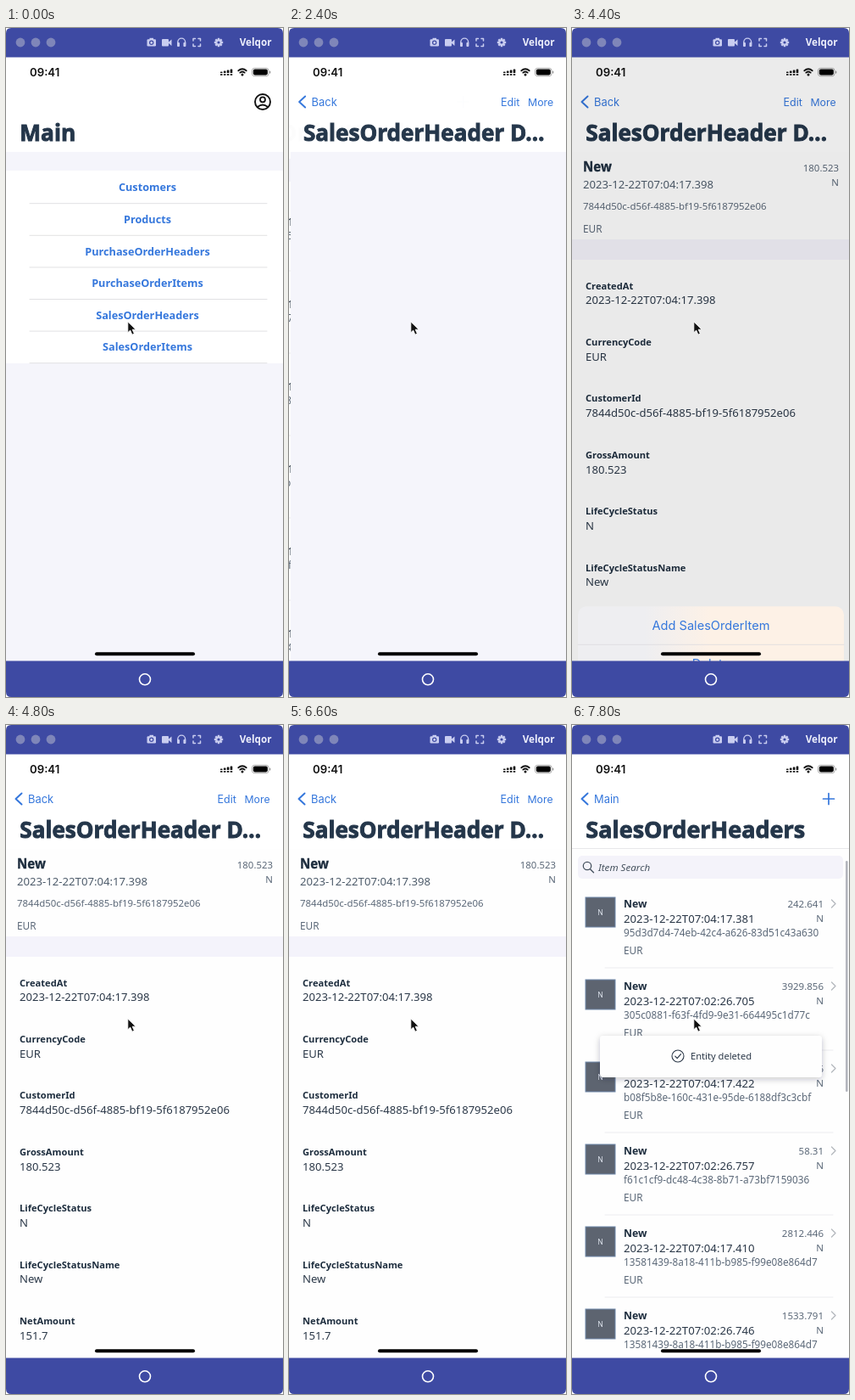
Recreate the animation shown at these times as an HTML page. Size 327 by 788 pixels, loop 8000 ms.

```html
<!DOCTYPE html>
<html lang="en">
<head>
<meta charset="utf-8">
<title>Order app demo</title>
<style>
html, body { margin: 0; width: 100%; height: 100%; overflow: hidden; background: #fff; }
svg { display: block; width: 100%; height: 100%; }
text { font-family: 'Noto Sans', sans-serif; white-space: pre; }
.title { font-weight: 700; fill: #24364a; stroke: #24364a; stroke-width: .9; }
.heavy { font-weight: 700; stroke: #1d2d3e; stroke-width: .35; }
.system { font-family: Inter, sans-serif; }
.semibold { font-family: Inter, sans-serif; font-weight: 600; }
.line { fill: none; stroke-linecap: round; stroke-linejoin: round; }
</style>
</head>
<body>
<svg id="stage" viewBox="0 0 327 788"></svg>
<script>
const BLUE = '#3577dc', INK = '#1d2d3e', GRAY = '#5b6878';
const WIDTH = 327, LOOP = 8000, STEP = 200, PARALLAX = 98, SLIDE = 490;

const text = (x, y, str, size, fill = INK, more = '') =>
  `<text x="${x}" y="${y}" font-size="${size}" fill="${fill}" ${more}>${str}</text>`;
const rect = (x, y, w, h, fill, more = '') =>
  `<rect x="${x}" y="${y}" width="${w}" height="${h}" fill="${fill}" ${more}/>`;
const line = (d, stroke, width = 1) =>
  `<path class="line" d="${d}" stroke="${stroke}" stroke-width="${width}"/>`;
const ring = (x, y, r, stroke, width) =>
  `<circle cx="${x}" cy="${y}" r="${r}" fill="none" stroke="${stroke}" stroke-width="${width}"/>`;
const bold = 'font-weight="700"', mid = 'text-anchor="middle"', end = 'text-anchor="end"';
const heavy = 'class="heavy"', system = 'class="system"', semibold = 'class="semibold"';
const title = (str, size) => text(16.3, 132.5, str, size, '#24364a', 'class="title"');
const group = (id, body) => `<g id="${id}">${body}</g>`;

const mainHead = () => title('Main', 26.3) + ring(303, 87, 9, '#111', 1.9) +
  ring(303, 84.3, 3, '#111', 1.8) + line('M297 93Q303 88 309 93', '#111', 1.8);

function mainPage() {
  const names = ['Customers', 'Products', 'PurchaseOrderHeaders', 'PurchaseOrderItems',
    'SalesOrderHeaders', 'SalesOrderItems'];
  const rows = names.map((name, i) => {
    const y = 192.3 + i * 37.6;
    return text(167, y, name, 12.7, BLUE, `${bold} ${mid}`) + line(`M28 ${y + 14.4}H308`, '#dedee0', .9);
  }).join('');
  return rect(0, 34, WIDTH, 712, '#f5f5fb') + rect(0, 168, WIDTH, 227, '#fff') + rows;
}

// time, amount, id
const orders = [
  ['07:04:17.398', '180.523', '7844d50c-d56f-4885-bf19-5f6187952e06'],
  ['07:04:17.381', '242.641', '95d3d7d4-74eb-42c4-a626-83d51c43a630'],
  ['07:02:26.705', '3929.856', '305c0881-f63f-4fd9-9e31-664495c1d77c'],
  ['07:04:17.422', '1204.516', 'b08f5b8e-160c-431e-95de-6188df3c3cbf'],
  ['07:02:26.757', '58.31', 'f61c1cf9-dc48-4c38-8b71-a73bf7159036'],
  ['07:04:17.410', '2812.446', '13581439-8a18-411b-b985-f99e08e864d7'],
  ['07:02:26.746', '1533.791', '13581439-8a18-411b-b985-f99e08e864d7']
];

function orderRow([time, amount, id], i) {
  return `<g transform="translate(0 ${i * 97})">` +
    rect(16, 203, 35, 35, '#5d6470', 'stroke="#6f87aa"') +
    text(33.5, 223.5, 'N', 8.5, '#dfe5ee', mid) +
    text(61, 214.8, 'New', 12.3, INK, bold) +
    text(61, 232.5, `2023-12-22T${time}`, 13.2, '#2b3848') +
    text(61, 249, id, 11.75, GRAY) + text(61, 269.5, 'EUR', 11.8, GRAY) +
    text(297, 215, amount, 11.5, GRAY, end) + text(297, 232, 'N', 11.5, GRAY, end) +
    line('M306.5 206L311 210.5L306.5 215', '#b4b8be', 1.3) +
    line('M39 286H308', '#e9e9ec', .9) + '</g>';
}

const backLink = (label, color = BLUE) =>
  line('M18.5 80.5L11.5 87L18.5 93.5', color, 2) + text(26, 91.5, label, 12.9, color, system);

const listHead = () => line('M0 145.5H327', '#e2e2e5', .8) + backLink('Main') +
  line('M296.5 87H309.5M303 80.5V93.5', BLUE, 1.7) + title('SalesOrderHeaders', 27);

function listPage() {
  return rect(0, 34, WIDTH, 712, '#fefefe') + rect(7, 154, 313, 27, '#f4f3fa', 'rx="5"') +
    ring(18, 166, 4.7, '#46525f', 1.3) + line('M21.5 169.7L25.5 173.7', '#46525f', 1.4) +
    text(31, 171.8, 'Item Search', 11.6, '#46525f', 'font-style="italic"') +
    group('rowsBefore', orders.slice(0, 6).map(orderRow).join('')) +
    group('rowsAfter', orders.slice(1).map(orderRow).join('')) +
    rect(323, 160, 2.6, 272, '#b3b5bd', 'rx="1.3" id="listScroll"');
}

const detailNav = color => backLink('Back', color) +
  text(249.5, 91.5, 'Edit', 12.5, color, system) + text(281.5, 91.5, 'More', 12.3, color, system);

const detailHead = () => group('navActive', detailNav(BLUE)) +
  group('navDimmed', detailNav('#9b9b9f')) + title('SalesOrderHeader D…', 26.1);

function detailPage() {
  const [time, amount, id] = orders[0];
  const stamp = `2023-12-22T${time}`;
  const fields = [['CreatedAt', stamp], ['CurrencyCode', 'EUR'], ['CustomerId', id],
    ['GrossAmount', amount], ['LifeCycleStatus', 'N'], ['LifeCycleStatusName', 'New'], ['NetAmount', '151.7']];
  const body = rect(0, 146, WIDTH, 600, '#fefefe') + rect(0, 249, WIDTH, 24, '#f4f3fb') +
    text(13, 168.8, 'New', 15.1, INK, heavy) + text(13, 188.5, stamp, 13.15, '#4e5c6b') +
    text(13, 214, id, 11.45, GRAY) + text(13, 240.5, 'EUR', 11.8, GRAY) +
    text(315, 169, amount, 11.4, GRAY, end) + text(315, 186, 'N', 11.4, GRAY, end) +
    fields.map(([label, value], i) => {
      const y = 307.5 + i * 66.4;
      return text(16, y, label, 11.15, INK, bold) + text(16, y + 17.8, value, 13.1, '#2b3848');
    }).join('') + rect(324, 275, 2, 190, '#c4c5cc', 'rx="1" id="detailScroll"');
  return rect(0, 34, WIDTH, 712, '#f5f5fb') + group('detailBody', body);
}

function statusBar() {
  const bars = [0, 1, 2, 3].map(i =>
    rect(253 + i * 3.9, 51.5 - i, 2.6, 1.5 + i, '#111', 'rx=".6"') +
    rect(253 + i * 3.9, 54, 2.6, 1.8, '#111', 'rx=".6"')).join('');
  return text(28, 57, '09:41', 13.2, '#111', semibold) + bars +
    line('M274.3 50.3Q279 46.2 283.7 50.3M276.3 52.6Q279 50.4 281.7 52.6', '#111', 1.8) +
    '<circle cx="279" cy="55" r="1.5" fill="#111"/>' +
    rect(290.5, 47.3, 19.5, 9.4, 'none', 'rx="2.8" stroke="#999" stroke-width=".8"') +
    rect(291.8, 48.6, 17, 6.8, '#000', 'rx="1.8"') + rect(311, 50.5, 1.3, 3, '#999', 'rx=".6"');
}

function windowBars() {
  const bar = '#3e4aa3', ice = '#c9cdf0';
  const dots = [17, 35, 53].map(x => `<circle cx="${x}" cy="17" r="5.4" fill="#7f86b9"/>`).join('');
  const teeth = [0, 45, 90, 135].map(a =>
    rect(249.8, 11.8, 2.4, 10.4, ice, `transform="rotate(${a} 251 17)"`)).join('');
  return `<path d="M0 34.5V6Q0 0 6 0H321Q327 0 327 6V34.5ZM0 745.5H327V782Q327 788 321 788H6Q0 788 0 782Z" fill="${bar}"/>` +
    dots + rect(166.5, 13.2, 10.5, 8.3, ice, 'rx="1.2"') + rect(169.5, 11.8, 4.5, 3, ice) +
    ring(171.7, 17.3, 2.1, bar, 1.2) +
    rect(184, 13, 8, 8.5, ice, 'rx="1"') + `<path d="M192 16.5L195.5 13.5V21L192 18Z" fill="${ice}"/>` +
    line('M202.8 18V16.5A4.4 4.4 0 0 1 211.6 16.5V18', ice, 1.4) +
    rect(202, 17, 3, 5, ice, 'rx="1"') + rect(209.4, 17, 3, 5, ice, 'rx="1"') +
    line('M221 15V12.5H223.5M227 12.5H229.5V15M229.5 19V21.5H227M223.5 21.5H221V19', ice, 1.5) +
    teeth + `<circle cx="251" cy="17" r="3.8" fill="${ice}"/><circle cx="251" cy="17" r="1.6" fill="${bar}"/>` +
    text(313.5, 20.5, 'Velqor', 11.7, '#eceefb', `${bold} ${end}`) + ring(164, 767.3, 6.5, '#fff', 1.6);
}

const sheet = () => rect(7, 583, 314, 89, 'url(#glass)', 'rx="10"') +
  line('M7 628H321', '#dcdbe0', .8) + rect(7, 680, 314, 44, '#fefefe', 'rx="10"') +
  text(164, 610.3, 'Add SalesOrderItem', 14.6, BLUE, `${system} ${mid}`) +
  text(164, 655.7, 'Delete', 14.7, BLUE, `${system} ${mid}`) +
  text(164, 707.3, 'Cancel', 14.8, '#2d70d8', `${semibold} ${mid}`);

const dialog = () => rect(57, 345, 214, 98, 'url(#glass)', 'rx="10"') +
  line('M57 408.3H271M164 408.3V443', '#d8d8dd', .8) +
  text(164, 373.5, 'Confirmation', 13.65, INK, `${heavy} ${mid}`) +
  text(164, 389.3, 'Delete current entity?', 12.7, INK, mid) +
  text(110.5, 431.3, 'Cancel', 12.6, BLUE, `${system} ${mid}`) +
  text(217.5, 431.3, 'OK', 13, BLUE, `${system} ${mid}`);

const toast = () => rect(33, 366, 262, 49, '#fefefe', 'rx="4" filter="url(#shadow)"') +
  ring(125, 390, 7, '#2b3848', 1.1) + line('M121.8 390.2L124.2 392.6L128.5 387.6', '#2b3848', 1.2) +
  text(140, 394.3, 'Entity deleted', 11.15, '#2b3848');

document.getElementById('stage').innerHTML = `<defs>
  <linearGradient id="glass"><stop offset=".25" stop-color="#eeeef1"/><stop offset=".5" stop-color="#fdf1e6"/></linearGradient>
  <filter id="shadow" x="-10%" y="-30%" width="120%" height="170%"><feDropShadow dx="0" dy="2" stdDeviation="3.5" flood-color="#223" flood-opacity=".25"/></filter>
  <clipPath id="screen"><rect y="34" width="327" height="712"/></clipPath></defs>
  <g clip-path="url(#screen)">` +
  group('main', mainPage()) + group('list', listPage()) + group('detail', detailPage()) +
  rect(0, 34, WIDTH, 112, '#fff') +
  group('mainHead', mainHead()) + group('listHead', listHead()) + group('detailHead', detailHead()) +
  group('toast', toast()) + statusBar() + rect(0, 34, WIDTH, 712, '#000', 'id="dim"') +
  group('sheet', sheet()) + group('dialog', dialog()) +
  rect(105, 735.3, 118, 4, '#000', 'rx="2"') + '</g>' + windowBars() +
  '<path d="M143.8 346V358.8L146.7 356.1L148.9 361.2L151.4 360.1L149.2 355.2H153.2Z" fill="#111" stroke="#fff" stroke-width=".9"/>';

const el = id => document.getElementById(id);
const show = (id, alpha) => { el(id).style.opacity = +alpha; };
const move = (id, x, y = 0) => el(id).setAttribute('transform', `translate(${x} ${y})`);
const between = (t, from, to) => t >= from && t < to;
const ease = (t, start, length) => {
  const u = Math.min(1, Math.max(0, (t - start) / length));
  return 1 - (1 - u) ** 3;
};

// Pages slide over each other, their headers cross-fade. enter and leave run from 0 to 1.
function placePage(id, enter, leave) {
  move(id, WIDTH * (1 - enter) - PARALLAX * leave);
  move(id + 'Head', PARALLAX * (1 - enter - leave));
  show(id + 'Head', enter * (1 - leave));
}

function draw(t) {
  const listIn = ease(t, 800, SLIDE);
  const detailIn = ease(t, 2000, SLIDE) - ease(t, 6900, SLIDE);
  const sheetIn = ease(t, 3200, 400) - ease(t, 4300, 400);
  const dialogIn = ease(t, 4900, 250) - ease(t, 6300, 250);

  placePage('main', 1, listIn);
  placePage('list', listIn, detailIn);
  placePage('detail', detailIn, 0);
  move('sheet', 0, 170 * (1 - sheetIn));

  const deleted = t >= 6800;
  show('rowsBefore', t >= 1200 && !deleted);
  show('rowsAfter', deleted);
  show('listScroll', between(t, 1400, 2000) || t >= 7400);
  show('detailBody', t >= 2600);
  show('detailScroll', between(t, 2600, 3800) ? .3 : 0);

  const modal = Math.max(sheetIn, dialogIn);
  show('dim', .19 * modal);
  show('navActive', modal < .5);
  show('navDimmed', modal >= .5);
  show('dialog', dialogIn);
  show('toast', ease(t, 7300, 400));
}

const start = performance.now();
function tick() {
  const t = (performance.now() - start) % LOOP;
  draw(Math.floor(t / STEP) * STEP);
  requestAnimationFrame(tick);
}
tick();
</script>
</body>
</html>
```
